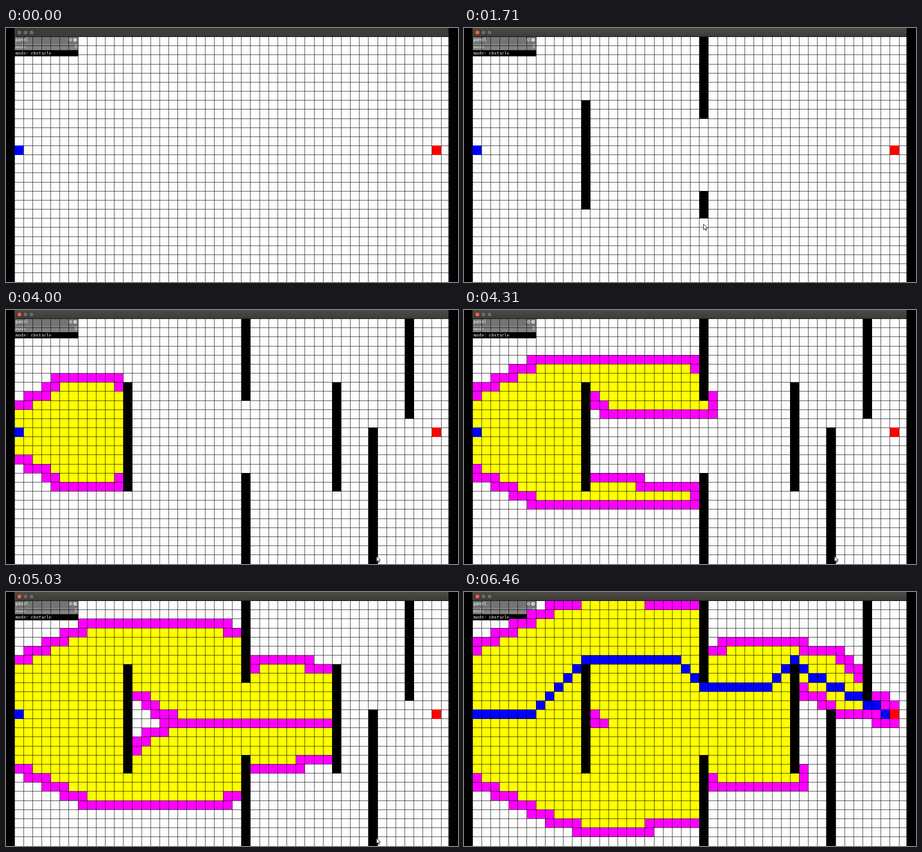
An HTML page for the animation above (6860 ms loop, 854 px wide and 480 px high).

```html
<!DOCTYPE html>
<html lang="en">
<head>
<meta charset="utf-8">
<title>Grid path search</title>
<style>
  html, body { margin: 0; width: 100%; height: 100%; overflow: hidden; background: #000; }
  svg { display: block; width: 854px; height: 480px; }
  text { font: 8.07px "DejaVu Sans Mono", monospace; fill: #fff; }
</style>
</head>
<body>
<svg viewBox="0 0 854 480">
  <defs>
    <linearGradient id="bar" x2="0" y2="1">
      <stop offset="0" stop-color="#4c4b46"/><stop offset="1" stop-color="#3c3b37"/>
    </linearGradient>
    <clipPath id="board"><rect x="16" y="16" width="820" height="464"/></clipPath>
  </defs>
  <rect width="854" height="480"/>
  <rect id="title" x="16" width="820" height="17"/>
  <g stroke="#2e2d2a" stroke-width=".8" fill="#6b6a64">
    <circle id="close" cx="25.3" cy="8.5" r="4.3"/>
    <circle cx="36.8" cy="8.5" r="4.3"/>
    <circle cx="48.2" cy="8.5" r="4.3"/>
  </g>
  <rect x="16" y="17" width="820" height="463" fill="#fdfdfd"/>
  <g clip-path="url(#board)">
    <rect x="16" y="17" width="120.5" height="11.5" fill="#747474"/>
    <rect x="16" y="29" width="120.5" height="12.5" fill="#828282"/>
    <path d="M16 28.7H136.5M16 41.7H136.5" stroke="#383838" stroke-width=".7"/>
    <rect x="16" y="42" width="120.5" height="11.5"/>
    <text x="18" y="25">panel</text>
    <text x="18" y="38" fill-opacity=".75">mode</text>
    <text x="129.3" y="38" fill-opacity=".75">0</text>
    <text x="18" y="50.5">mode: obstacle</text>
    <circle cx="122" cy="22.3" r="2.3" fill="none" stroke="#fff"/>
    <path d="M128 20h5v5h-5zM130.5 20v5M128 22.5h5" fill="none" stroke="#fff"/>
    <path id="closed" fill="#ff0"/>
    <path id="open" fill="#f0f"/>
    <path id="route" fill="#00f"/>
    <path id="grid" fill="none" stroke="#000" stroke-opacity=".7"/>
    <path id="walls"/>
    <path id="start" fill="#00f"/>
    <path id="goal" fill="#f00"/>
  </g>
  <path id="cursor" d="M0 0V10.5L2.4 8.4L4 12L5.8 11.2L4.2 7.7H7.4Z" fill="#fff" stroke="#000" stroke-width=".9"/>
</svg>
<script>
const LOOP = 6860, FRAME = 200 / 7;
const COLS = 48, ROWS = 27, SIZE = 17.152, LEFT = 16, TOP = 16.67;
const START = { x: 0, y: 12 }, GOAL = { x: 46, y: 12 };
const ROW_TIME = 27, SEARCH_START = 130 * FRAME, EPS = 1e-9;

const WALLS = [
  { col: 12, top: 7, rows: 12, at: 430 },
  { col: 25, top: 0, rows: 9, at: 1060 },
  { col: 25, top: 17, rows: 10, at: 1616 },
  { col: 35, top: 7, rows: 12, at: 2160 },
  { col: 43, top: 0, rows: 11, at: 2700 },
  { col: 39, top: 12, rows: 15, at: 3165 }
];

const el = id => document.getElementById(id);
const setPath = (id, d) => el(id).setAttribute("d", d);
const xOf = c => LEFT + c * SIZE;
const yOf = r => TOP + r * SIZE;
const key = ({ x, y }) => y * COLS + x;
const same = (a, b) => a.x === b.x && a.y === b.y;

function block({ x, y }, rows = 1) {
  const [x0, x1, y0, y1] = [xOf(x), xOf(x + 1), yOf(y), yOf(y + rows)].map(Math.round);
  return `M${x0} ${y0}H${x1}V${y1}H${x0}Z`;
}
const blocks = cells => cells.map(c => block(c)).join("");

const isWall = (x, y) => WALLS.some(w => x === w.col && y >= w.top && y < w.top + w.rows);

function neighbours(cell) {
  const list = [];
  for (let dy = -1; dy <= 1; dy++) for (let dx = -1; dx <= 1; dx++) {
    const x = cell.x + dx, y = cell.y + dy;
    const inside = x >= 0 && y >= 0 && x < COLS && y < ROWS;
    if ((dx || dy) && inside && !isWall(x, y)) list.push({ x, y, cost: Math.hypot(dx, dy) });
  }
  return list;
}

// ties go to the cell nearer the goal, then to the upper one
const before = (a, b) =>
  Math.abs(a.f - b.f) > EPS ? a.f < b.f :
  Math.abs(a.h - b.h) > EPS ? a.h < b.h : a.y < b.y;

// A* with straight-line estimate: expanded cells in order, and the route traced back
function search() {
  const node = ({ x, y }, g, parent) => {
    const h = Math.hypot(GOAL.x - x, GOAL.y - y);
    return { x, y, g, h, f: g + h, parent };
  };
  const open = new Map([[key(START), node(START, 0, null)]]);
  const done = new Set(), order = [], route = [];
  while (open.size) {
    const best = [...open.values()].reduce((a, b) => before(b, a) ? b : a);
    if (same(best, GOAL)) {
      for (let n = best.parent; n; n = n.parent) route.push(n);
      break;
    }
    open.delete(key(best));
    done.add(key(best));
    order.push(best);
    for (const next of neighbours(best)) {
      const k = key(next), g = best.g + next.cost;
      if (!done.has(k) && (!open.has(k) || g < open.get(k).g - EPS)) open.set(k, node(next, g, best));
    }
  }
  return { order, route };
}

// the pointer travels down each wall, rests, then leaves the window
function pointerPath() {
  const points = [{ t: 120, x: 330, y: 480 }];
  for (const { col, top, rows, at } of WALLS) {
    const x = xOf(col + .45), travel = rows - .85;
    points.push({ t: at, x, y: yOf(top) }, { t: at + travel * ROW_TIME, x, y: yOf(top + travel) });
  }
  points[points.length - 1].x = 700;
  points.push({ t: 6130, x: 700, y: 465 }, { t: 6300, x: 440, y: 262 }, { t: 6450, x: 184, y: 480 });
  return points;
}

const { order, route } = search();
const pointer = pointerPath();

// expansion slows slightly as the frontier grows
function stepsAt(t) {
  const d = Math.max(0, (t - SEARCH_START) / FRAME);
  return Math.floor(d * (10.906 - .01046 * d));
}

function drawGrid() {
  let d = "";
  for (let c = 0; c < COLS; c++) d += `M${Math.floor(xOf(c)) + .5} 17V480`;
  for (let r = 0; r < ROWS; r++) d += `M16 ${Math.floor(yOf(r)) + .5}H836`;
  setPath("grid", d);
  setPath("start", block(START));
  setPath("goal", block(GOAL));
}

function drawSearch(t) {
  const steps = stepsAt(t), closed = order.slice(0, steps), open = [];
  const seen = new Set(closed.map(key));
  for (const next of closed.flatMap(neighbours)) {
    if (!seen.has(key(next))) {
      seen.add(key(next));
      open.push(next);
    }
  }
  setPath("closed", blocks(closed));
  setPath("open", blocks(open));
  setPath("route", blocks(route.slice(0, Math.max(0, steps - order.length))));
}

function drawWalls(t) {
  setPath("walls", WALLS.map(({ col, top, rows, at }) => {
    const drawn = Math.min(rows, Math.floor((t - at) / ROW_TIME));
    return drawn > 0 ? block({ x: col, y: top }, drawn) : "";
  }).join(""));
}

function drawPointer(t) {
  const i = pointer.findIndex(p => p.t > t);
  el("cursor").setAttribute("visibility", i > 0 ? "visible" : "hidden");
  if (i < 1) return;
  const a = pointer[i - 1], b = pointer[i], u = (t - a.t) / (b.t - a.t);
  el("cursor").setAttribute("transform", `translate(${a.x + (b.x - a.x) * u} ${a.y + (b.y - a.y) * u})`);
}

let shown = -1;
function render(now) {
  // frame starts fall on whole hundredths of a second
  const frame = Math.floor((now % LOOP + 5.72) / FRAME);
  if (frame === shown) return;
  shown = frame;
  const t = frame * FRAME + .01, focused = t > 50;
  el("close").setAttribute("fill", focused ? "#ee6040" : "#6b6a64");
  el("title").setAttribute("fill", focused ? "url(#bar)" : "#3d3c39");
  drawWalls(t);
  drawSearch(t);
  drawPointer(t);
}

drawGrid();
const begin = performance.now();
function tick() {
  render(performance.now() - begin);
  requestAnimationFrame(tick);
}
render(0);
requestAnimationFrame(tick);
</script>
</body>
</html>
```
